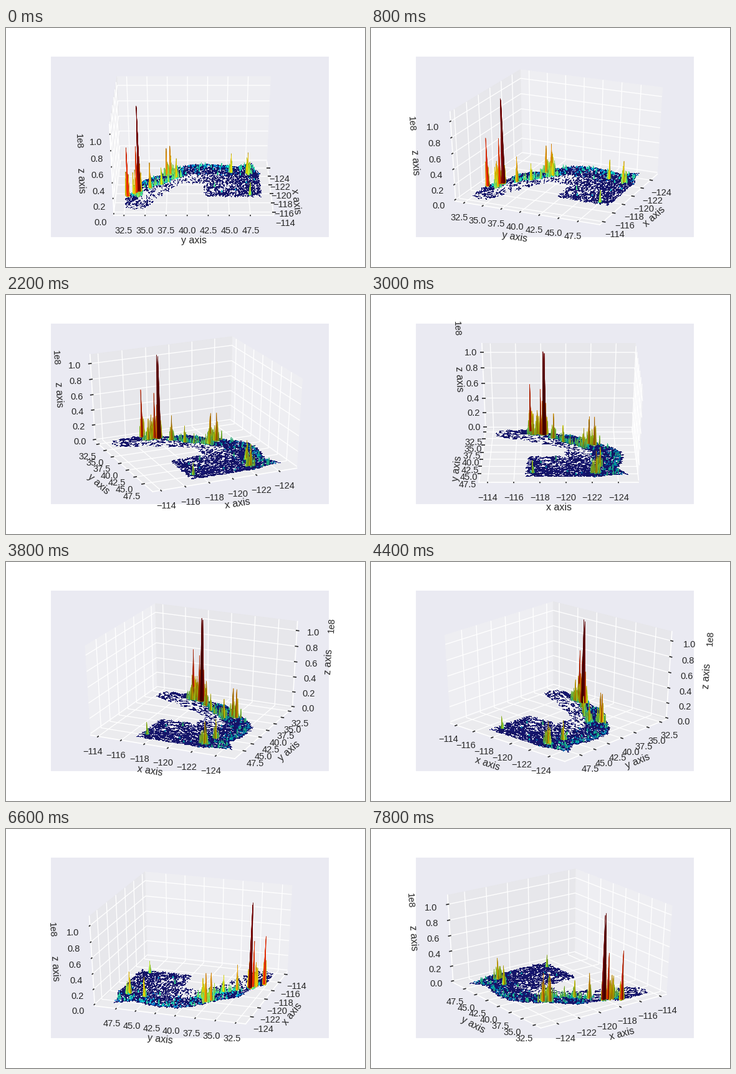
A matplotlib script that plays this animation: 576x384 px, repeating every 8000 ms.

```python
import math

import matplotlib.pyplot as plt
import numpy as np
from matplotlib.animation import FuncAnimation
from matplotlib.collections import LineCollection, PolyCollection
from matplotlib.patches import Polygon, Rectangle

plt.rcParams["font.family"] = "Liberation Sans"
W, H, DPI = 576, 384, 96
FRAMES, STEP = 40, 6
ELEV = math.radians(30)
INK = "0.15"

# data limits of the box, mapped to a unit cube around zero
LOW = np.array([-125.3, 31.68, 0.0])
HIGH = np.array([-113.58, 49.88, 1.0915])
EDGE = 25 / 48
TICK_PAD, LABEL_PAD = 0.0833, 0.181

# plot area and the screen position of the cube centre
LEFT, BOTTOM, WIDE, TALL = 72, 48, 446.4, 289.9
CX = LEFT + WIDE * 0.95 / 1.85
CY = BOTTOM + TALL * 0.95 / 1.85
SX, SY = WIDE / 0.185, TALL / 0.185

# lon, lat, peak height and spread of the crowded places
CITIES = [
    (-118.2, 34.05, 1.0915, 0.12), (-118.3, 34.05, 1.07, 0.12),
    (-117.95, 33.8, 0.6, 0.3), (-117.35, 34.0, 0.28, 0.25),
    (-117.1, 32.75, 0.63, 0.12), (-119.02, 35.37, 0.33, 0.08),
    (-119.78, 36.75, 0.22, 0.1), (-121.9, 37.35, 0.36, 0.15),
    (-122.3, 37.8, 0.37, 0.2), (-121.45, 38.6, 0.25, 0.12),
    (-122.65, 45.5, 0.25, 0.12), (-122.32, 47.6, 0.28, 0.2),
    (-117.42, 47.65, 0.16, 0.06)]

rng = np.random.default_rng(7)


def unit(p):
    return (np.asarray(p, float) - LOW) / (HIGH - LOW) - 0.5


def coast(lat):
    return np.interp(lat, [32.5, 33.7, 34.5, 36.6, 38.9, 40.4, 42.8, 46.2, 48.3, 48.5, 49],
                     [-117.1, -118.3, -120.6, -121.9, -123.7, -124.35, -124.5,
                      -123.95, -124.7, -123.1, -122.75])


def border(lat):
    return np.interp(lat, [32.6, 34.3, 35, 39, 42, 42.01],
                     [-114.6, -114.1, -114.6, -120, -120, -117])


def land_points(n):
    lon, lat = rng.uniform((-124.8, 32.55), (-114, 49), (n, 2)).T
    inside = (lon > coast(lat)) & (lon < border(lat))
    return lon[inside], lat[inside]


def make_ground():
    lon, lat = land_points(9000)
    # full near the ocean, thin in the deserts
    cover = np.where(lat > 42, 0.42, 0.2)
    cover = np.where(lat > 45.9, 0.7, cover)
    cover = np.where(lon - coast(lat) < 2.2, 0.9, cover)
    keep = rng.random(len(lon)) < cover
    centre = np.column_stack([lon, lat])[keep]
    n = len(centre)
    tri = np.zeros((n, 3, 3))
    tri[:, :, :2] = centre[:, None] + rng.normal(0, (0.1, 0.06), (n, 3, 2))
    tri[:, 0, 2] = 0.012 * rng.random(n) ** 3
    tint = rng.uniform(0.8, 1, (n, 1)) * [0.09, 0.09, 0.46]
    return unit(tri), tint


def make_spots():
    spots = []
    for lon, lat, peak, spread in CITIES:
        spots.append((lon, lat, peak))
        for _ in range(int(8 + 90 * spread)):
            dx, dy = rng.normal(0, spread, 2)
            fall = math.exp(-0.5 * math.hypot(dx, dy) / spread)
            z = 0.02 + min(peak, 0.8) * fall * rng.random() ** 1.3
            spots.append((lon + dx, lat + dy, z))
    # towns along the central valley and the ocean side
    for t in rng.random(70):
        spots.append((-118.9 - 2.9 * t + rng.normal(0, 0.15),
                      35.2 + 4 * t + rng.normal(0, 0.15),
                      0.015 + 0.12 * rng.random() ** 2))
    for lat in rng.uniform(32.7, 48.6, 150):
        spots.append((coast(lat) + 0.1 + rng.exponential(0.5), lat,
                      0.008 + 0.04 * rng.random() ** 3))
    for lon, lat in zip(*land_points(35)):
        spots.append((lon, lat, 0.01 + 0.05 * rng.random() ** 2))
    return spots


def make_spikes():
    faces, tints = [], []
    for x, y, z in make_spots():
        rx, ry = 0.04 * (1 + z), 0.06 * (1 + 1.3 * z)
        ring = [(x - rx, y - ry, 0), (x + rx, y - ry, 0),
                (x + rx, y + ry, 0), (x - rx, y + ry, 0)]
        hue = np.array(plt.cm.jet(min(1, z / HIGH[2]) ** 0.27)[:3])
        for k in range(4):
            faces.append([ring[k], ring[(k + 1) % 4], (x, y, z)])
            # faces across the x axis catch the light
            tints.append(hue * (0.98 if k % 2 else 0.52))
    return unit(faces), np.array(tints)


class View:
    def __init__(self, azim):
        a = math.radians(azim)
        ca, sa, ce, se = math.cos(a), math.sin(a), math.cos(ELEV), math.sin(ELEV)
        self.eye = np.array([ce * ca, ce * sa, se])
        self.right = np.array([-sa, ca, 0])
        self.up = np.array([-se * ca, -se * sa, ce])

    def depth(self, p):
        return 10 - np.asarray(p) @ self.eye

    def flat(self, p):
        p = np.asarray(p)
        d = self.depth(p)
        return np.stack([CX + SX * (p @ self.right) / d,
                         CY + SY * (p @ self.up) / d], axis=-1)


fig = plt.figure(figsize=(W / DPI, H / DPI), dpi=DPI, facecolor="white")
ax = fig.add_axes([0, 0, 1, 1])
ax.set(xlim=(0, W), ylim=(0, H))
ax.axis("off")
ax.add_patch(Rectangle((LEFT, BOTTOM), WIDE, TALL, fc="#EAEAF2", lw=0, zorder=0))


def write(text, size, **kw):
    return ax.text(0, 0, text, size=size, color=INK, zorder=3, **kw)


class Axis:
    def __init__(self, index, name, ticks, names, tickdir, flips, grey):
        self.i, self.tickdir, self.flips = index, tickdir, flips
        self.locs = (np.array(ticks) - LOW[index]) / (HIGH - LOW)[index] - 0.5
        self.pane = ax.add_patch(Polygon(np.zeros((4, 2)), fc=str(grey),
                                         ec=str(grey), alpha=0.5, lw=0.5, zorder=1))
        self.grid = ax.add_collection(
            LineCollection([], colors="white", linewidths=1, zorder=2))
        self.line, = ax.plot([], [], color="white", lw=1.25, zorder=2)
        self.marks = ax.add_collection(
            LineCollection([], colors=INK, linewidths=1.25,
                           capstyle="butt", zorder=2.5))
        self.texts = [write(s, 11, ha="center", va="top") for s in names]
        self.label = write(name, 12, ha="center", va="center")
        self.offset = None
        if index == 2:
            self.offset = write("1e8", 11, va="center", rotation_mode="anchor")

    def push(self, p, pad):
        """Move a point away from the centre, except along the axis."""
        q = p + np.sign(p) * pad
        q[self.i] = p[self.i]
        return q

    def at(self, base, k, value):
        q = base.copy()
        q[k] = value
        return q

    def update(self, view):
        i = self.i
        highs = view.eye < -1e-9
        back = np.where(highs, EDGE, -EDGE)
        j, k = (i + 1) % 3, (i + 2) % 3
        corners = []
        for u, v in ((-1, -1), (1, -1), (1, 1), (-1, 1)):
            corners.append(self.at(self.at(back, j, u * EDGE), k, v * EDGE))
        self.pane.set_xy(view.flat(corners))

        lines = []
        for loc in self.locs:
            mid = self.at(back, i, loc)
            lines.append(view.flat([self.at(mid, j, -back[j]), mid,
                                    self.at(mid, k, -back[k])]))
        self.grid.set_segments(lines)

        a, b = self.flips
        start = self.at(back, a, -back[a])
        end = self.at(start, b, -start[b])
        p, q = view.flat([start, end])
        self.line.set_data([p[0], q[0]], [p[1], q[1]])

        t = self.tickdir
        sign = 1 if highs[t] else -1
        marks = []
        for loc, text in zip(self.locs, self.texts):
            pos = self.at(start, i, loc)
            marks.append(view.flat([self.at(pos, t, pos[t] + sign * 0.1 / 12),
                                    self.at(pos, t, pos[t] - sign * 0.2 / 12)]))
            text.set_position(view.flat(self.push(pos, TICK_PAD)))
        self.marks.set_segments(marks)

        angle = math.degrees(math.atan2(q[1] - p[1], q[0] - p[0])) % 180
        if angle > 90:
            angle -= 180
        self.label.set_position(view.flat(self.push((start + end) / 2, LABEL_PAD)))
        self.label.set_rotation(angle)
        if self.offset:
            far = view.depth(end) >= 10 and highs.sum() % 2 == 0
            self.offset.set_position(view.flat(self.push(end, LABEL_PAD)))
            self.offset.set_rotation(angle)
            self.offset.set_ha("right" if q[0] >= CX or far else "left")


lons = range(-124, -113, 2)
lats = np.arange(32.5, 48, 2.5)
pops = np.arange(6) * 0.2
axes = [
    Axis(0, "x axis", lons, [f"\u2212{-v}" for v in lons], 1, (1, 0), 0.95),
    Axis(1, "y axis", lats, [f"{v:.1f}" for v in lats], 0, (0, 1), 0.9),
    Axis(2, "z axis", pops, [f"{v:.1f}" for v in pops], 0, (0, 2), 0.925)]

ground, ground_tint = make_ground()
spikes, spike_tint = make_spikes()
floor = ax.add_collection(PolyCollection(
    [], facecolors=ground_tint, edgecolors="none", antialiaseds=False, zorder=4))
towers = ax.add_collection(PolyCollection([], linewidths=0.3, zorder=5))


def update(n):
    view = View(n * STEP)
    for axis in axes:
        axis.update(view)
    floor.set_verts(view.flat(ground))
    order = np.argsort(-view.depth(spikes.mean(axis=1)))
    towers.set_verts(view.flat(spikes[order]))
    towers.set_facecolor(spike_tint[order])
    towers.set_edgecolor(spike_tint[order])
    return []


anim = FuncAnimation(fig, update, frames=FRAMES, interval=200,
                     repeat=True, repeat_delay=0, init_func=lambda: [])
plt.show()
```
